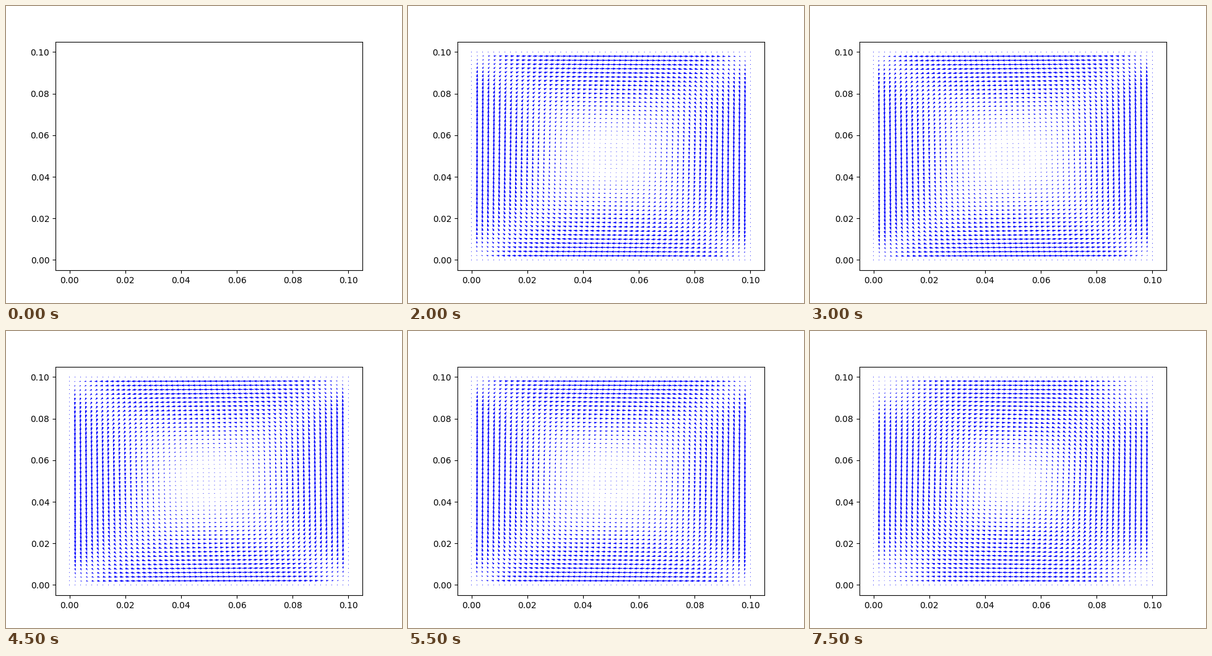
Animation of 640x480 px, one loop 8 s. Source, as a matplotlib script:

```python
import numpy as np
import matplotlib.pyplot as plt
from matplotlib.animation import FuncAnimation

SIZE = 0.1        # side of the square
N = 50            # grid intervals per side
FRAMES = 16
PERIOD = 10       # frames per drive cycle
LAG = 0.02        # drive frequency relative to the slowest decay rate

grid = np.linspace(0, SIZE, N + 1)
X, Y = np.meshgrid(grid, grid)

# Sine modes of the diffusion equation, zero on the walls, uniform drive
m = np.arange(1, N)
modes = np.sin(np.pi * np.outer(np.arange(N + 1), m) / N)
weight = modes.sum(axis=0)
source = np.outer(weight, weight)
rate = np.sin(np.pi * m / (2 * N)) ** 2
rate = (rate[:, None] + rate[None, :]) / (2 * rate[0])
response = modes @ (source / (rate + 1j * LAG)) @ modes.T


def field(k):
    """Curl of the potential driven by sin(2 pi k / PERIOD)."""
    a = (np.exp(2j * np.pi * k / PERIOD) * response).imag
    u, v = np.zeros_like(a), np.zeros_like(a)
    u[1:-1, 1:-1] = a[:-2, 1:-1] - a[2:, 1:-1]
    v[1:-1, 1:-1] = a[1:-1, 2:] - a[1:-1, :-2]
    return u, v


fig, ax = plt.subplots(figsize=(6.4, 4.8), dpi=100)


def draw(k):
    ax.cla()
    ax.set_xlim(-0.05 * SIZE, 1.05 * SIZE)
    ax.set_ylim(-0.05 * SIZE, 1.05 * SIZE)
    if k > 0:  # the field starts at rest
        ax.quiver(X, Y, *field(k), color="b")
    return []


anim = FuncAnimation(fig, draw, frames=FRAMES, interval=500,
                     repeat=True, repeat_delay=0, blit=False)
plt.show()
```
